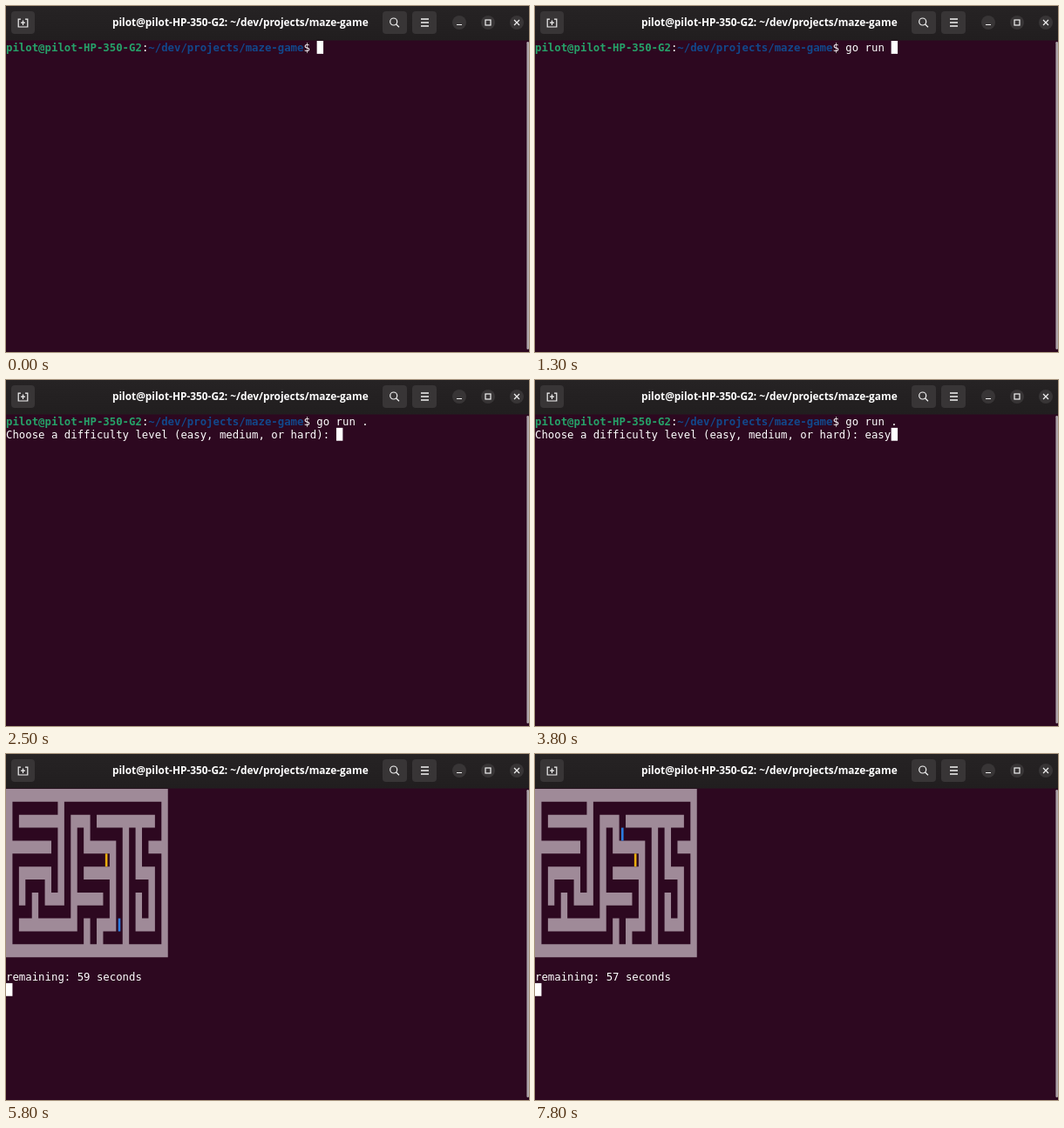
An HTML page for the animation above (8000 ms loop, 600 px wide and 397 px high).

```html
<!DOCTYPE html>
<html lang="en">
<head>
<meta charset="utf-8">
<title>Maze game</title>
<style>
  html, body { margin: 0; width: 100%; height: 100%; overflow: hidden; background: #2d0820; }
  svg { display: block; width: 100vw; height: 100vh; }
  .title { font: bold 11.88px "Open Sans", "Noto Sans", sans-serif; fill: #fff; text-anchor: middle; }
  .term text { font: 12.34px "DejaVu Sans Mono", monospace; fill: #fff; white-space: pre; }
  .user { fill: #26a269; font-weight: bold; }
  .path { fill: #12488b; font-weight: bold; }
  .icon { fill: none; stroke: #f2f2f2; stroke-width: 1.2; }
</style>
</head>
<body>
<svg viewBox="0 0 600 397" xmlns="http://www.w3.org/2000/svg">
  <defs>
    <linearGradient id="bar" x2="0" y2="1">
      <stop offset="0" stop-color="#262324"/>
      <stop offset="1" stop-color="#211e1f"/>
    </linearGradient>
  </defs>
  <rect width="600" height="397" fill="#2d0820"/>
  <rect width="600" height="39.5" fill="url(#bar)"/>
  <rect x="597.4" y="41" width="2.6" height="353" rx="1.2" fill="#aea6aa"/>

  <g fill="#383536">
    <rect x="6" y="6" width="27" height="26" rx="4"/>
    <rect x="432" y="6" width="28" height="26" rx="4"/>
    <rect x="466" y="6" width="28" height="26" rx="4"/>
    <circle cx="520" cy="19" r="8"/>
    <circle cx="553" cy="19" r="8"/>
    <circle cx="586" cy="19" r="8"/>
  </g>
  <g class="icon">
    <path d="M17 15.2H14.2V24H24.8V15.2H22M19.5 16.5V22M17 19.2H22"/>
    <circle cx="444.7" cy="18" r="4"/>
    <path d="M447.6 21L451 24.3"/>
    <path d="M476 15H485M476 19H485M476 23H485" stroke-width="1.5"/>
    <path d="M517 21.5H523M583 16L589 22M589 16L583 22"/>
    <rect x="550" y="16" width="6" height="6"/>
  </g>
  <text class="title" x="268.8" y="23">pilot@pilot-HP-350-G2: ~/dev/projects/maze-game</text>

  <g class="term">
    <g id="shell">
      <text x="0" y="52"><tspan class="user">pilot@pilot-HP-350-G2</tspan>:<tspan class="path">~/dev/projects/maze-game</tspan>$ <tspan id="command"></tspan></text>
      <text id="question" x="0" y="66.9"></text>
    </g>
    <g id="game">
      <path transform="translate(0 40) scale(7.43 14.86) translate(.5 .5)"
        fill="none" stroke="#9f8a98" stroke-linecap="square"
        d="M0 0H24V12H0Z M8 0V8H6V6H2V8 M2 2H8 M0 4H6 M4 8V10
           M2 10H10V2H12V4H16V10H14V12 M12 6H16 M10 8H14 M12 10V12
           M14 2H22 M18 2V12 M20 2V6H22V10H20V8 M22 4H24"/>
      <rect id="goal" width="2.6" height="14.9" fill="#e9ad0c"/>
      <rect id="player" width="2.6" height="14.9" fill="#2a7bde"/>
      <text id="timer" x="0" y="260"></text>
    </g>
    <rect id="cursor" width="7.43" height="14.86" fill="#fff"/>
  </g>
</svg>
<script>
const LOOP = 8000, COL = 7.43, ROW = 14.86, TOP = 40;
const PROMPT_COLS = 48;
const QUESTION = "Choose a difficulty level (easy, medium, or hard): ";
const ENTER = 1800, ASK = 2500, START = 4200, FIRST_TICK = 5300;
const commandKeys = [200, 400, 600, 800, 1000, 1200, 1300, 1500];
const answerKeys = [2800, 3000, 3300, 3500];
const firstMoves = [5000, 5500, 5800];
const MOVE_GAP = 180;

const $ = id => document.getElementById(id);
const show = (id, on) => $(id).setAttribute("visibility", on ? "inherit" : "hidden");
const passed = (times, t) => times.filter(at => t >= at).length;

function place(id, col, row, inset = 0) {
  $(id).setAttribute("x", col * COL + inset);
  $(id).setAttribute("y", TOP + row * ROW);
}

const placePiece = (id, col, row) => place(id, col, row, (COL - 2.6) / 2);

// Route: two cells right, eight up, four left.
function playerCell(step) {
  if (step <= 2) return [15 + step, 11];
  if (step <= 10) return [17, 13 - step];
  return [27 - step, 3];
}

function drawShell(t) {
  const typed = "go run .".slice(0, passed(commandKeys, t));
  const line = t < ASK ? "" : QUESTION + "easy".slice(0, passed(answerKeys, t));
  $("command").textContent = typed;
  $("question").textContent = line;
  if (t < ENTER) place("cursor", PROMPT_COLS + typed.length, 0);
  else place("cursor", line.length, 1);
}

function drawGame(t) {
  const later = Math.max(0, Math.floor((t - 5800) / MOVE_GAP));
  const step = Math.min(14, passed(firstMoves, t) + later);
  const ticking = t >= FIRST_TICK;
  const left = 59 - Math.floor((t - FIRST_TICK) / 1000);
  placePiece("player", ...playerCell(step));
  $("timer").textContent = ticking ? `remaining: ${left} seconds` : "";
  place("cursor", 0, ticking ? 15 : 14);
}

function render(t) {
  const playing = t >= START;
  show("shell", !playing);
  show("game", playing);
  show("cursor", t < 4800 || t >= 5000);
  (playing ? drawGame : drawShell)(t);
}

placePiece("goal", 15, 5);
const begin = performance.now();
function frame() {
  render((performance.now() - begin) % LOOP);
  requestAnimationFrame(frame);
}
frame();
</script>
</body>
</html>
```
